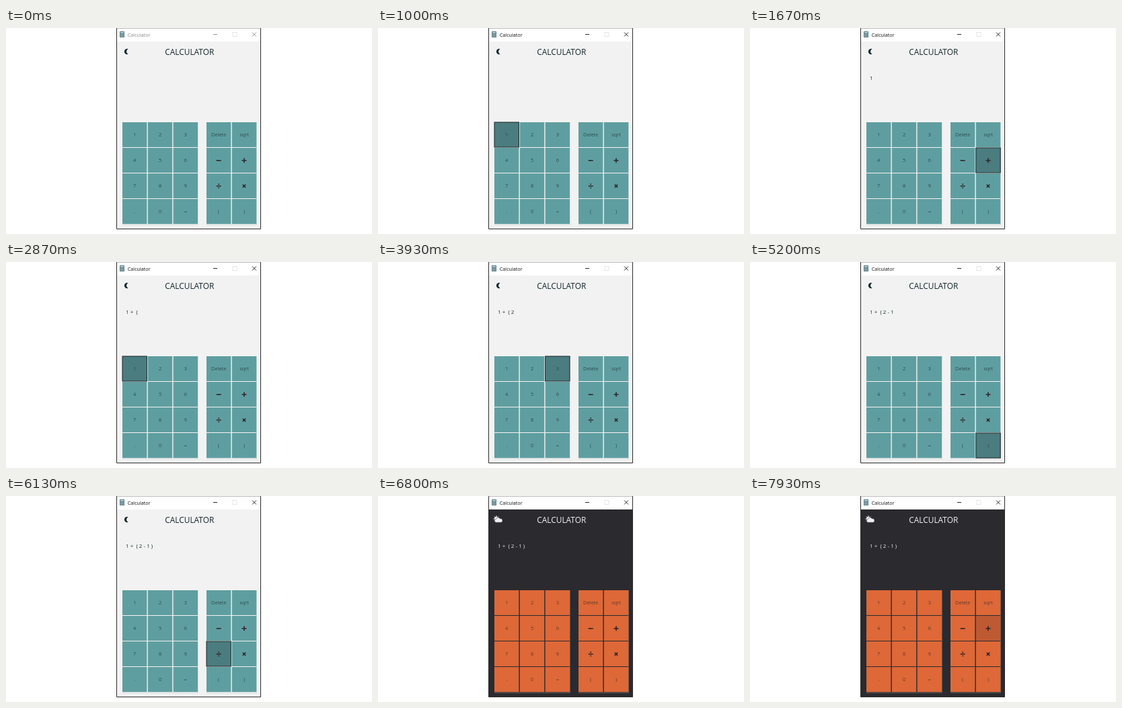
These frames come from a looping animation (544 px wide and 306 px high, 8 s). An HTML page:

```html
<!DOCTYPE html>
<html>
<head>
<meta charset="utf-8">
<title>Calculator</title>
<style>
html, body { margin: 0; width: 100%; height: 100%; overflow: hidden; background: #fff; }
svg {
  display: block;
  --bg: #f2f2f2; --ink: #16292d; --key: #5f9ea0; --hover: #4b7c7f;
  --label: #2d4c50; --sign: #2f272b; --edge: #d3dddd; --ring: #1b2527;
  font-family: "Open Sans", "Noto Sans", sans-serif;
}
svg.dark {
  --bg: #2b2a2f; --ink: #f0f0f0; --key: #de6837; --hover: #bd5a33;
  --label: #65392a; --sign: #2b2426; --edge: #655b56; --ring: none;
}
.body { fill: var(--bg); }
.ink { fill: var(--ink); }
.key { fill: var(--key); }
.key.over { fill: var(--hover); stroke: var(--ring); }
.label { fill: var(--label); font-size: 7.4px; text-anchor: middle; }
.sign { fill: none; stroke: var(--sign); stroke-width: 1.6; }
.edge { fill: var(--edge); }
.bar { --bar: #111; }
.bar.idle { --bar: #8a8a8a; }
.bar text { fill: var(--bar); font-size: 7.2px; }
.bar .glyph { fill: none; stroke: var(--bar); stroke-width: .9; }
.dark .moon, svg:not(.dark) .cloud { display: none; }
</style>
</head>
<body>
<svg id="stage" width="544" height="306" viewBox="0 0 544 306">
  <rect x="164" width="215" height="299" fill="#fff"/>
  <rect class="body" x="165" y="20" width="213" height="278"/>
  <g id="bar" class="bar">
    <rect x="169" y="5" width="7" height="9" rx=".6" fill="#587b84"/>
    <path d="M170 7h5" stroke="#c4e5ea" stroke-width="1.5"/>
    <path d="M170 10h5M170 12.2h5" stroke="#e4eef0" stroke-dasharray="1.1 .8"/>
    <text x="180.8" y="12.7">Calculator</text>
    <path class="glyph" d="M308 9.5h6M366 6.5l6 6m0-6l-6 6"/>
    <rect x="337" y="6.5" width="6" height="6" fill="none" stroke="#dedede" stroke-width=".8"/>
  </g>
  <path class="ink moon" d="M181.5 31.2A4.1 4.1 0 1 0 181.5 38.8A4.2 4.2 0 0 1 181.5 31.2Z"/>
  <g class="ink cloud">
    <path d="M176 29v10M171.5 34h9M172.7 30.5l6.6 6.6M172.7 37l6.6-6.6" stroke="#f0f0f0"/>
    <circle cx="176" cy="33.5" r="2.8"/>
    <path d="M175 39.2a2.5 2.5 0 0 1 .3-4.8a3.4 3.4 0 0 1 6.2-.7a2.8 2.8 0 0 1 1.4 5.5Z" stroke="#2b2a2f" stroke-width=".5"/>
  </g>
  <text class="ink" x="272.8" y="39.8" font-size="11.9" text-anchor="middle">CALCULATOR</text>
  <text class="ink" id="display" x="178" y="76.8" font-size="8" xml:space="preserve"></text>
  <g id="keys"></g>
  <path d="M164.5 0V298.5H378.5V0" fill="none" stroke="#2d2d2d"/>
  <path d="M164 .3H379" stroke="#777" stroke-width=".6"/>
</svg>
<script>
const stage = document.getElementById("stage");
const bar = document.getElementById("bar");
const display = document.getElementById("display");
const group = document.getElementById("keys");
const LOOP = 8000, ACTIVE = 200, DARK = 6670;

const columns = [173, 210.8, 248.6, 298, 335.8];
const rows = ["123 Delete sqrt", "456 - +", "789 / *", ".0= ( )"];
const signs = {
  "-": "M-3.5 0h7",
  "+": "M-3.5 0h7M0-3.5v7",
  "/": "M-3.5 0h7M-.9-2.7h1.8M-.9 2.7h1.8",
  "*": "M-2.2-2.2l4.4 4.4M2.2-2.2l-4.4 4.4"
};

// [time, value] steps; each value holds until the next one
const hovers = [
  [0, ""], [600, "5"], [730, ""], [930, "1"], [1470, "2"], [1530, "3"], [1600, "-"],
  [1670, "+"], [2130, "*"], [2200, "/"], [2270, "("], [2670, "9"], [2730, "5"],
  [2870, "1"], [3000, "2"], [3930, "3"], [4000, "-"], [4600, "3"], [4670, "2"],
  [4730, "1"], [5000, "5"], [5070, "9"], [5130, "("], [5200, ")"], [5800, "*"],
  [5870, "/"], [6200, "5"], [6270, "1"], [6470, ""], [7330, "1"], [7400, "2"],
  [7530, "3"], [7800, "-"], [7930, "+"]
];
const texts = [
  [0, ""], [1200, "1"], [1870, "1 +"], [2600, "1 +  ("], [3270, "1 +  ( 2"],
  [4270, "1 +  ( 2 -"], [4730, "1 +  ( 2 - 1"], [5470, "1 +  ( 2 - 1 )"]
];

function add(tag, attributes, text = "") {
  const node = document.createElementNS("http://www.w3.org/2000/svg", tag);
  for (const name in attributes) node.setAttribute(name, attributes[name]);
  node.textContent = text;
  group.append(node);
  return node;
}

for (const x of [173, 298]) {
  add("rect", { class: "edge", x, y: 140, width: x < 200 ? 112.8 : 75, height: 152.8 });
  add("rect", { class: "body", x, y: 140, width: x < 200 ? 111.8 : 74, height: 151.5 });
}

const keys = {};
rows.forEach((row, r) => {
  const [digits, ...others] = row.split(" ");
  [...digits, ...others].forEach((name, c) => {
    const x = columns[c], y = 140 + r * 38;
    keys[name] = add("rect", { class: "key", x, y, width: 36.4, height: 37 });
    const middle = x + 18.2;
    if (signs[name]) add("path", { class: "sign", d: signs[name], transform: `translate(${middle} ${y + 18.8})` });
    else add("text", { class: "label", x: middle, y: y + 21.4 }, name);
  });
});

const at = (steps, t) => steps.findLast(step => step[0] <= t)[1];

function draw(now) {
  const t = now % LOOP;
  const hovered = at(hovers, t);
  for (const name in keys) keys[name].classList.toggle("over", name === hovered);
  display.textContent = at(texts, t);
  bar.classList.toggle("idle", t < ACTIVE);
  stage.classList.toggle("dark", t >= DARK);
  requestAnimationFrame(draw);
}
draw(performance.now());
</script>
</body>
</html>
```
